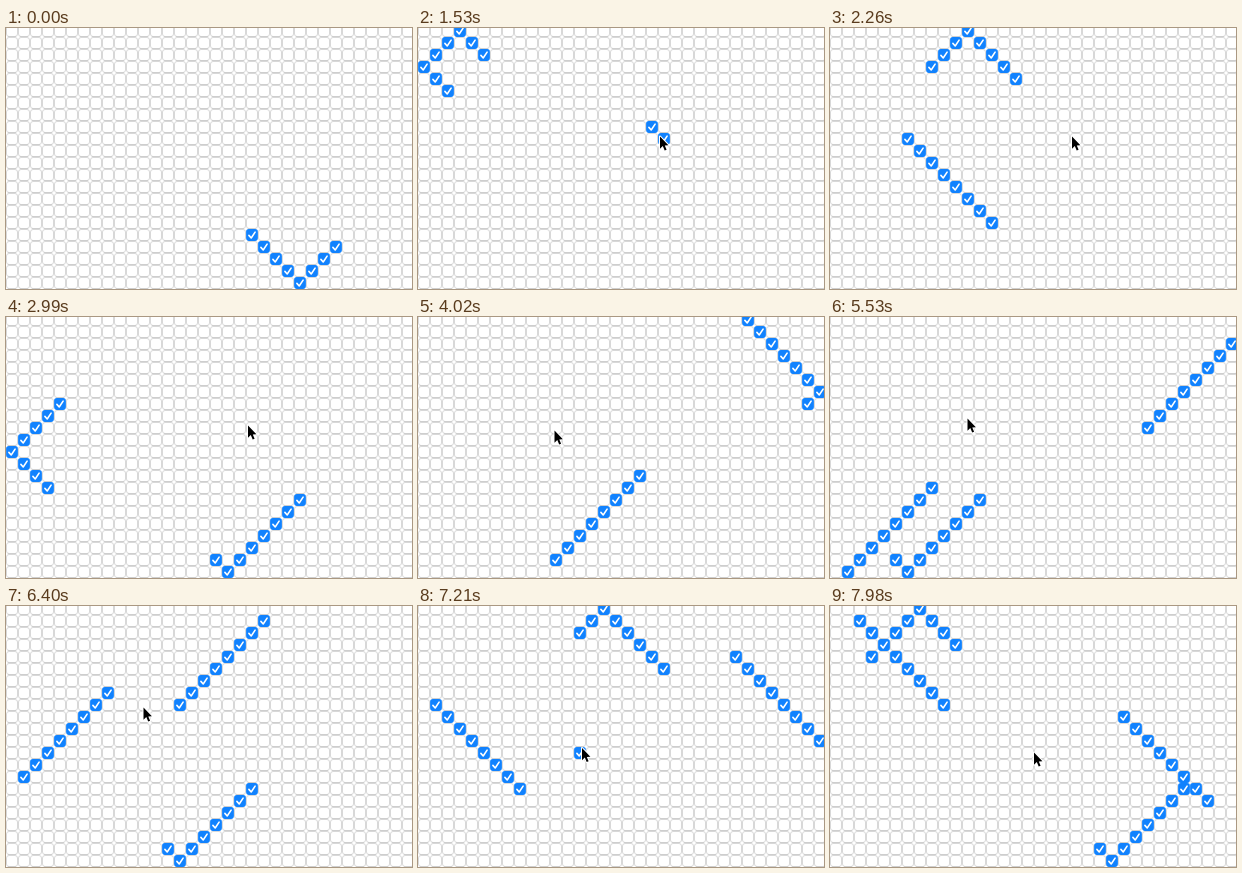
Animation, 406 px wide and 261 px high, one loop 8 s. Source, as an HTML page with a canvas:

```html
<!DOCTYPE html>
<html lang="en">
<head>
<meta charset="utf-8">
<title>Checkbox snakes</title>
<style>
  html, body { margin: 0; width: 100%; height: 100%; overflow: hidden; background: #fff; }
  canvas { display: block; }
</style>
</head>
<body>
<canvas id="stage" width="406" height="261"></canvas>
<script>
const ctx = document.getElementById('stage').getContext('2d');
const LOOP = 8000, TICK = 67.6, DELAY = 15;
const CELL = 12, COLS = 34, ROWS = 22, TOP = -3, LENGTH = 8;

// Each snake moves one cell diagonally per tick and bounces off the walls.
const snakes = [
  { born: 0, x: 20, y: 17, dx: -1, dy: -1, grown: true },
  { born: 21, x: 20, y: 9, dx: -1, dy: -1 },
  { born: 62, x: 11, y: 9, dx: -1, dy: 1 },
  { born: 106, x: 13, y: 12, dx: -1, dy: -1 }
];

// The pointer glides to each stop, arriving at the given time.
const GLIDE = 180;
const stops = [
  { at: 740, x: 330, y: 150 },
  { at: 920, x: 242, y: 108.5 },
  { at: 3900, x: 136.5, y: 113.5 },
  { at: 4480, x: 137.5, y: 101.5 },
  { at: 6900, x: 164, y: 142 },
  { at: 7740, x: 204, y: 146.5 }
];

function pointerAt(t) {
  let { x, y } = stops[0];
  for (const stop of stops.slice(1)) {
    const f = Math.min(1, Math.max(0, 1 + (t - stop.at) / GLIDE));
    x += (stop.x - x) * f;
    y += (stop.y - y) * f;
  }
  return [x, y];
}

function bounce(v, max) {
  return max - Math.abs(Math.abs(v) % (2 * max) - max);
}

function polyline(points) {
  ctx.beginPath();
  points.forEach(([x, y]) => ctx.lineTo(x, y));
}

function drawAt(x, y, paint) {
  ctx.save();
  ctx.translate(x, y);
  paint();
  ctx.restore();
}

function drawCell(col, row, paint) {
  drawAt(col * CELL, TOP + row * CELL, paint);
}

function emptyBox() {
  ctx.lineWidth = 1;
  ctx.strokeStyle = '#d8d8d8';
  ctx.beginPath();
  ctx.roundRect(0.5, 0.5, 11, 11, 2.5);
  ctx.stroke();
  ctx.fillStyle = '#cecece';
  ctx.fillRect(2, 11, 8, 1);
}

function checkedBox() {
  ctx.fillStyle = '#fff';
  ctx.fillRect(0, 0, CELL, CELL);
  ctx.fillStyle = '#1182fe';
  ctx.beginPath();
  ctx.roundRect(0.1, 0.1, 11.8, 11.8, 2.8);
  ctx.fill();
  ctx.strokeStyle = '#fff';
  ctx.lineWidth = 1.6;
  ctx.lineCap = ctx.lineJoin = 'round';
  polyline([[2.9, 6.4], [5.2, 9], [9.1, 3.1]]);
  ctx.stroke();
}

function arrow() {
  polyline([[0, 0], [0, 12.2], [2.8, 9.6], [4.7, 14], [6.6, 13.2], [4.8, 9], [8.4, 8.8]]);
  ctx.closePath();
  ctx.lineWidth = 2;
  ctx.lineJoin = 'round';
  ctx.strokeStyle = '#fff';
  ctx.stroke();
  ctx.fillStyle = '#000';
  ctx.fill();
}

function render(t) {
  ctx.fillStyle = '#fff';
  ctx.fillRect(0, 0, 406, 261);
  for (let row = 0; row < ROWS; row++)
    for (let col = 0; col < COLS; col++) drawCell(col, row, emptyBox);

  const tick = Math.max(0, Math.floor((t - DELAY) / TICK));
  for (const s of snakes) {
    const head = tick - s.born;
    const tail = head - LENGTH + 1;
    for (let k = s.grown ? tail : Math.max(0, tail); k <= head; k++)
      drawCell(bounce(s.x + s.dx * k, COLS - 1), bounce(s.y + s.dy * k, ROWS - 1), checkedBox);
  }

  if (t >= stops[0].at) drawAt(...pointerAt(t), arrow);
}

const start = performance.now();
function frame() {
  render((performance.now() - start) % LOOP);
  requestAnimationFrame(frame);
}
frame();
</script>
</body>
</html>
```
